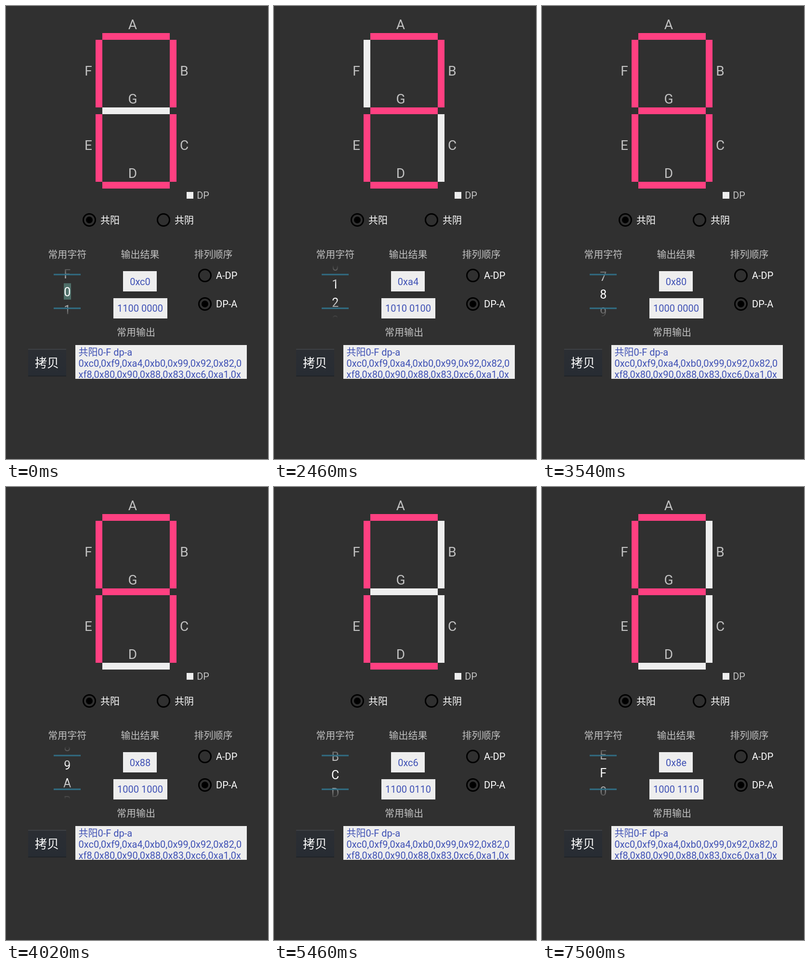
An HTML page for the animation above (8000 ms loop, 544 by 938 pixels).

```html
<!DOCTYPE html>
<html lang="zh">
<head>
<meta charset="utf-8">
<title>Seven-segment encoder</title>
<style>
  html, body { margin: 0; width: 100%; height: 100%; overflow: hidden; background: #303030; }
  svg { display: block; width: 544px; height: 938px; }
  text { font: 20px Roboto, "Noto Sans CJK SC", "Noto Sans CJK", sans-serif; fill: #fff; white-space: pre; }
  .mid { text-anchor: middle; }
  .label { fill: #c1c1c1; }
  .big { font-size: 28px; }
  .button, .wheel { font-size: 25px; }
  .code { fill: #3f51b5; }
</style>
</head>
<body>
<svg id="stage" viewBox="0 0 544 938">
  <defs>
    <linearGradient id="fade" x2="0" y2="1">
      <stop offset="0" stop-color="#fff" stop-opacity="0"/>
      <stop offset=".38" stop-color="#fff"/>
      <stop offset=".62" stop-color="#fff"/>
      <stop offset="1" stop-color="#fff" stop-opacity="0"/>
    </linearGradient>
    <mask id="edges" maskUnits="userSpaceOnUse" x="99" y="537" width="56" height="109">
      <rect x="99" y="537" width="56" height="109" fill="url(#fade)"/>
    </mask>
    <linearGradient id="buttonFill" x2="0" y2="1">
      <stop offset="0" stop-color="#2b2e33"/>
      <stop offset="1" stop-color="#272c33"/>
    </linearGradient>
    <clipPath id="listClip"><rect x="144" y="702" width="356" height="70"/></clipPath>
  </defs>
</svg>
<script>
const LOOP = 8000, STEP = 60, ROW = 37.3;
const GLYPHS = '0123456789ABCDEF';
const CODES = [0xc0, 0xf9, 0xa4, 0xb0, 0x99, 0x92, 0x82, 0xf8,
               0x80, 0x90, 0x88, 0x83, 0xc6, 0xa1, 0x86, 0x8e];
const stage = document.getElementById('stage');

function add(tag, attrs, parent = stage) {
  const node = document.createElementNS('http://www.w3.org/2000/svg', tag);
  for (const name in attrs) node.setAttribute(name, attrs[name]);
  return parent.appendChild(node);
}
function rect(x, y, width, height, fill = '#eee', parent = stage) {
  return add('rect', { x, y, width, height, fill }, parent);
}
function text(content, x, y, style = '', parent = stage) {
  const node = add('text', { x, y, class: style }, parent);
  node.textContent = content;
  return node;
}
function radio(cx, cy, checked) {
  add('circle', { cx, cy, r: 12.5, fill: 'none', stroke: '#000', 'stroke-width': 3 });
  if (checked) add('circle', { cx, cy, r: 7 });
}

// Segments in bit order A..G, DP
const segments = [
  [200, 56, 140, 14], [340, 70, 14, 140], [340, 224, 14, 140], [200, 364, 140, 14],
  [186, 224, 14, 140], [186, 70, 14, 140], [200, 210, 140, 14], [375, 385, 14, 14]
].map(box => rect(...box));

[['A', 263, 48], ['B', 370, 144], ['C', 370, 298], ['D', 263, 356],
 ['E', 171, 298], ['F', 171, 144], ['G', 263, 202]
].forEach(item => text(...item, 'label big mid'));
text('DP', 409, 399, 'label mid');

radio(173, 443, true);
text('共阳', 196, 450.5);
radio(327, 443, false);
text('共阴', 350, 450.5);
radio(413, 558, false);
text('A-DP', 436, 565);
radio(413, 617, true);
text('DP-A', 436, 624);

text('常用字符', 127.3, 522, 'label mid');
text('输出结果', 278.5, 522, 'label mid');
text('排列顺序', 430.5, 522, 'label mid');
text('常用输出', 270, 683, 'label mid');

rect(243, 549, 70, 42);
const hexText = text('', 278.5, 578, 'code mid');
rect(223, 605, 112, 42);
const binaryText = text('', 278.5, 633, 'code mid');

rect(46, 710, 79, 57, 'url(#buttonFill)');
rect(46, 710, 79, 1.5, '#44464a');
rect(46, 765.5, 79, 1.5, '#1d2025');
text('拷贝', 85, 747.5, 'button mid');

rect(144, 702, 356, 70);
const list = add('g', { 'clip-path': 'url(#listClip)' });
['共阳0-F dp-a',
 '0xc0,0xf9,0xa4,0xb0,0x99,0x92,0x82,0',
 'xf8,0x80,0x90,0x88,0x83,0xc6,0xa1,0x'
].forEach((line, i) => text(line, 150.5, 724 + 23 * i, 'code', list));

const wheel = add('g', { mask: 'url(#edges)' });
const highlight = rect(120, 574, 15, 34, '#50716b', wheel);
const rows = [-1, 0, 1, 2].map(() => text('', 127.2, 0, 'wheel mid', wheel));
rect(99, 554.5, 56, 3, '#33b5e5', wheel);
rect(99, 624.5, 56, 3, '#33b5e5', wheel);

function snap(from, to, elapsed) {
  const left = Math.max(0, 1 - elapsed / 800);
  return to - (to - from) * left ** 5;
}

function fling(t) {
  const x = (5250 - t) / 1000;
  return 11.55 - x * (1.4267 + .7556 * (x - .75) + .311 * (x - .75) * (x - 1.71));
}

// Wheel position in rows: short drag, fling, second drag, each settled by a snap
function position(t) {
  if (t < 1440) return 0;
  if (t < 1830) return Math.min(.6, .6 * (t - 1440) / 360);
  if (t < 2320) return snap(.6, 1, t - 1830);
  if (t < 2500) return 1 + .69 * ((t - 2320) / 180) ** 2;
  if (t < 5250) return fling(t);
  if (t < 6080) return snap(11.55, 12, t - 5250);
  if (t < 7050) return 12 + 2.55 * (1 - Math.max(0, 1 - (t - 6080) / 400) ** 2);
  return snap(14.55, 15, t - 7050);
}

function draw(t) {
  const pos = position(t);
  const code = CODES[Math.floor(pos + .67)];
  const binary = code.toString(2);

  segments.forEach((segment, bit) =>
    segment.setAttribute('fill', code >> bit & 1 ? '#eee' : '#ff4081'));
  hexText.textContent = '0x' + code.toString(16);
  binaryText.textContent = binary.slice(0, 4) + ' ' + binary.slice(4);

  rows.forEach((row, i) => {
    const index = Math.floor(pos) + i - 1;
    row.textContent = GLYPHS[(index + 16) % 16];
    row.setAttribute('y', Math.round(601 + (index - pos) * ROW));
  });
  highlight.setAttribute('visibility', t < 1260 ? 'visible' : 'hidden');
}

const start = performance.now();
function tick() {
  const t = (performance.now() - start) % LOOP;
  draw(Math.floor(t / STEP) * STEP);
  requestAnimationFrame(tick);
}
tick();
</script>
</body>
</html>
```
